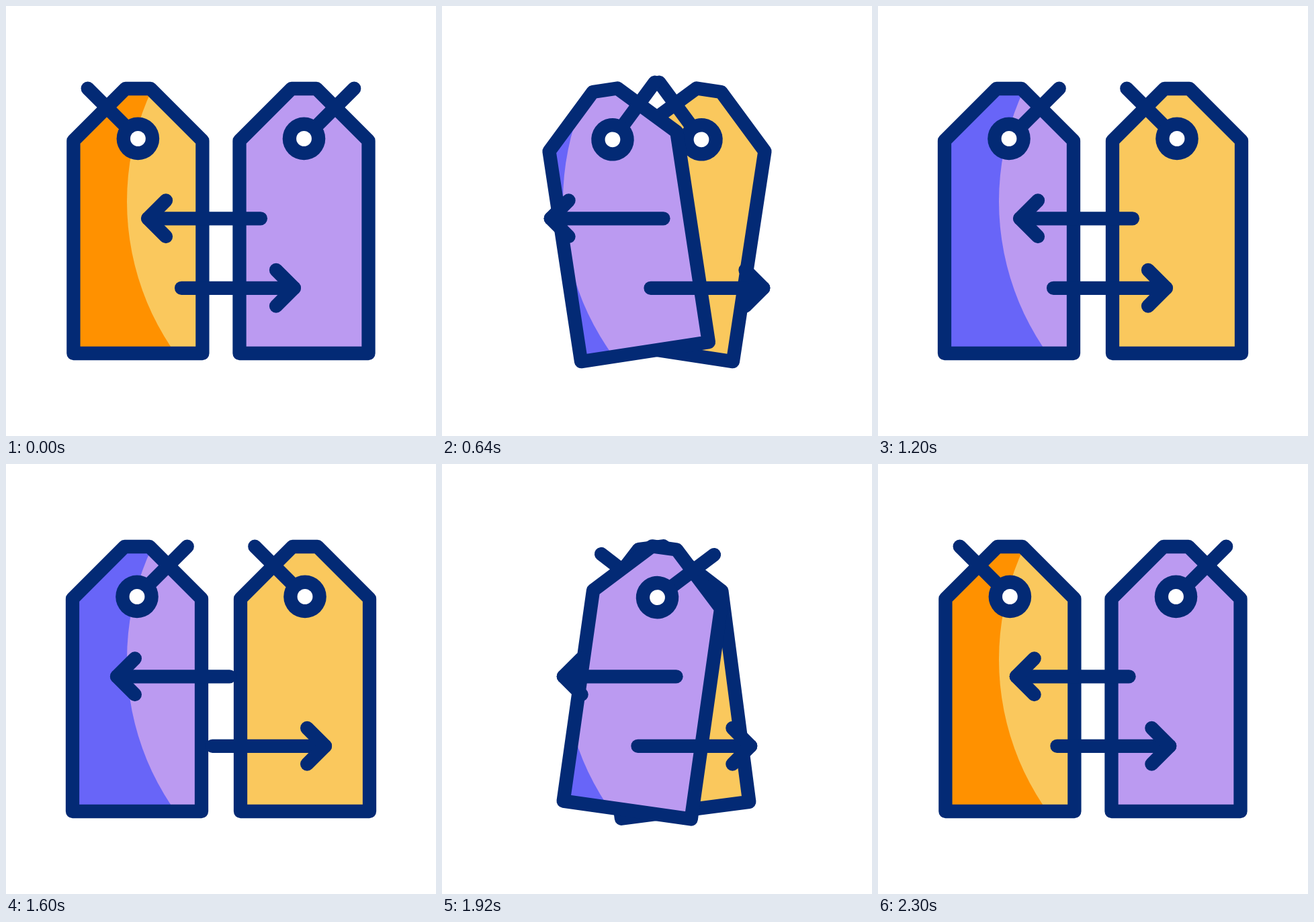
An HTML page with a canvas that plays this animation: 640 by 640 pixels, repeating every 2400 ms.

```html
<!DOCTYPE html>
<html lang="en">
<head>
<meta charset="utf-8">
<title>Tag swap</title>
<style>
  html, body { margin: 0; width: 100%; height: 100%; overflow: hidden; background: #fff; }
  canvas { display: block; width: 640px; height: 640px; }
</style>
</head>
<body>
<canvas id="stage" width="640" height="640"></canvas>
<script>
const ctx = document.getElementById('stage').getContext('2d');
const LOOP = 2400, STEP = 20, MIDDLE = 320;
const NAVY = '#032a75', LINE = 20.3;
const HOLE_Y = -122.6;

// Each tag tilts against its direction of travel; `sway` is the peak on the way back.
const orange = { from: 196.4, to: 445, side: -1, sway: 8.3, dark: '#ff9100', light: '#fac85d' };
const purple = { from: 443.5, to: 195, side: 1, sway: 9, dark: '#6865f8', light: '#bb9af1' };

// Smooth step from 0 to 1 between two times.
function ease(t, start, end) {
  const u = Math.min(1, Math.max(0, (t - start) / (end - start)));
  return u * u * (3 - 2 * u);
}

const swap = t => ease(t, 200, 900) - ease(t, 1600, 2300);

// Lean out, swing past upright and settle; then lean once on the way back.
function tilt(t, sway) {
  const there = 9 * ease(t, 200, 700) - 13 * ease(t, 700, 1000) + 4 * ease(t, 1000, 1200);
  const back = ease(t, 1600, 2000) - ease(t, 2000, 2300);
  return there - sway * back;
}

// The arrows slide out and back once a second, starting at 200 ms.
function reach(t) {
  const phase = t < 200 ? 0 : (t - 200) % 1000;
  return 51.5 * (ease(phase, 0, 500) - ease(phase, 500, 1000));
}

function disc(x, y, r, color) {
  ctx.beginPath();
  ctx.arc(x, y, r, 0, Math.PI * 2);
  ctx.fillStyle = color;
  ctx.fill();
}

function strokeLine(...points) {
  ctx.beginPath();
  points.forEach(([x, y]) => ctx.lineTo(x, y));
  ctx.stroke();
}

// Upright body with 45 degree shoulders, centred on the origin.
function outline() {
  const w = 96, h = 197, cut = 77.5;
  ctx.beginPath();
  ctx.moveTo(-w, h);
  ctx.lineTo(-w, cut - h);
  ctx.lineTo(cut - w, -h);
  ctx.lineTo(w - cut, -h);
  ctx.lineTo(w, cut - h);
  ctx.lineTo(w, h);
  ctx.closePath();
}

function drawTag(tag, t) {
  const { from, to, side } = tag;

  ctx.save();
  ctx.translate(from + (to - from) * swap(t), MIDDLE);
  ctx.rotate(-side * tilt(t, tag.sway) * Math.PI / 180);
  outline();
  ctx.fillStyle = tag.dark;
  ctx.fill();

  // The light area stays fixed on the stage while the tag moves across it.
  ctx.save();
  ctx.clip();
  ctx.resetTransform();
  disc(571, 291, 391, tag.light);
  ctx.restore();

  outline();
  ctx.stroke();
  strokeLine([side * 20, HOLE_Y - 20], [side * 74.7, HOLE_Y - 74.7]);
  disc(0, HOLE_Y, 31.8, NAVY);
  disc(0, HOLE_Y, 11.4, '#fff');
  ctx.restore();
}

function drawArrow(y, dir, shift) {
  const tip = MIDDLE + dir * (108.8 + shift);
  const back = tip - dir * 26.8;
  strokeLine([tip, y], [tip - dir * 167.7, y]);
  strokeLine([back, y - 26.8], [tip, y], [back, y + 26.8]);
}

function draw(t) {
  ctx.fillStyle = '#fff';
  ctx.fillRect(0, 0, 640, 640);
  ctx.strokeStyle = NAVY;
  ctx.lineWidth = LINE;
  ctx.lineCap = ctx.lineJoin = 'round';

  drawTag(orange, t);
  drawTag(purple, t);
  drawArrow(316.3, -1, reach(t));
  drawArrow(419.8, 1, reach(t));
}

const start = performance.now();
function frame() {
  const t = (performance.now() - start) % LOOP;
  draw(Math.floor(t / STEP) * STEP);
  requestAnimationFrame(frame);
}
frame();
</script>
</body>
</html>
```
